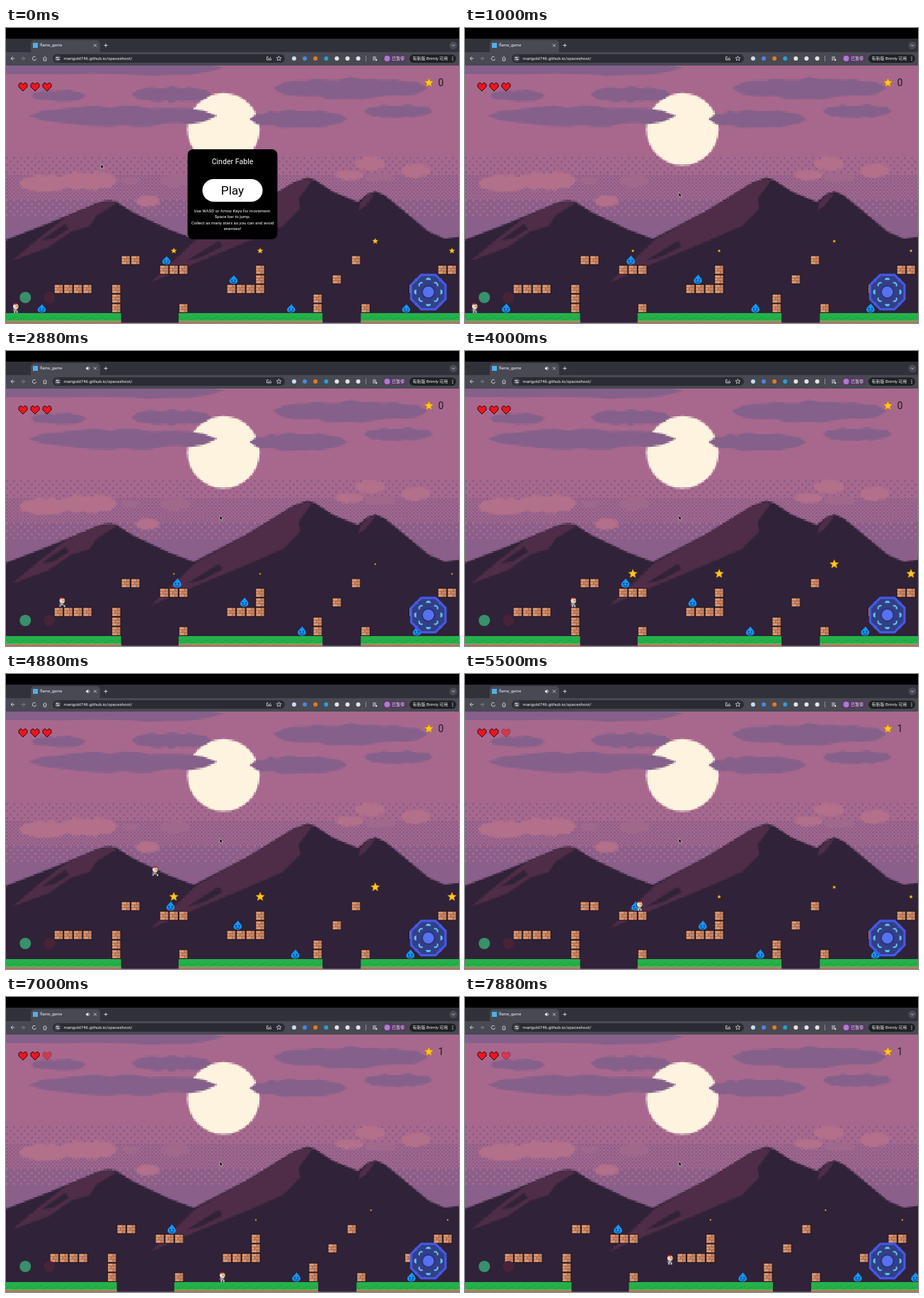
Recreate the animation shown at these times as an HTML page with a canvas. Size 640 by 416 pixels, loop 8 s.

```html
<!DOCTYPE html>
<html lang="zh">
<head>
<meta charset="utf-8">
<title>flame_game</title>
<style>
html, body { margin: 0; width: 640px; height: 416px; overflow: hidden; background: #000; }
canvas { display: block; }
</style>
</head>
<body>
<canvas id="stage" width="640" height="416"></canvas>
<script>
const ctx = document.getElementById('stage').getContext('2d');
const LOOP = 8000, STEP = 125, U = 13.55;
const UI = 'Roboto, "Noto Sans CJK SC", "Noto Sans CJK", sans-serif';
const colX = c => (c + 0.5) * U;
const rowY = r => 395.2 - r * U;
const mix = (a, b, k) => a + (b - a) * k;
const clamp = k => Math.min(1, Math.max(0, k));
const ease = k => k * k * (3 - 2 * k);

function random(seed) {
  return () => (seed = (seed * 16807) % 2147483647) / 2147483647;
}
function layer(w, h) {
  const c = document.createElement('canvas');
  c.width = w;
  c.height = h;
  return c;
}
function rect(c, color, x, y, w, h) {
  c.fillStyle = color;
  c.fillRect(x, y, w, h);
}
function round(c, color, x, y, w, h, r) {
  c.fillStyle = color;
  c.beginPath();
  c.roundRect(x, y, w, h, r);
  c.fill();
}
function disc(c, color, x, y, r) {
  c.fillStyle = color;
  c.beginPath();
  c.arc(x, y, r, 0, Math.PI * 2);
  c.fill();
}
function path(c, points) {
  c.beginPath();
  for (const p of points.split(' ')) c.lineTo(...p.split(',').map(Number));
}
function poly(c, color, points) {
  path(c, points);
  c.closePath();
  c.fillStyle = color;
  c.fill();
}
function line(c, color, width, points) {
  path(c, points);
  c.strokeStyle = color;
  c.lineWidth = width;
  c.stroke();
}
function text(c, str, x, y, size, color, align = 'left') {
  c.font = size + 'px ' + UI;
  c.textAlign = align;
  c.textBaseline = 'middle';
  c.fillStyle = color;
  c.fillText(str, x, y);
}
// Linear interpolation through [time, value] points
function track(keys, t) {
  let i = 1;
  while (i < keys.length - 1 && keys[i][0] < t) i++;
  const [t0, a] = keys[i - 1], [t1, b] = keys[i];
  return mix(a, b, clamp((t - t0) / (t1 - t0)));
}

// ---- landscape, painted small and enlarged for chunky pixels
function cloud(c, color, x0, y0, x1, y1) {
  const rnd = random(x0 * 31 + y1 * 7 + 1), n = 14, edge = [];
  const mid = mix(y0, y1, 0.52), half = (y1 - y0) / 2;
  for (let i = 0; i < 2 * n; i++) {
    const s = i < n ? i / n * 2 - 1 : 1 - (i - n) / n * 2;
    const h = half * (1 - s * s) ** 0.45 * mix(0.75, 1.1, rnd());
    edge.push(`${mix(x0, x1, (s + 1) / 2)},${mid + (i < n ? -h : h)}`);
  }
  poly(c, color, edge.join(' '));
}
function paintLandscape(out) {
  const P = 2.5, top = 52;
  const small = layer(256, 146), c = small.getContext('2d');
  const high = '#a8688d', low = '#8a5f8a';
  const dark = '#302238', lit = '#4f2d48';
  rect(c, high, 0, 0, 256, 76);
  rect(c, low, 0, 76, 256, 70);
  for (let y = 51; y < 86; y++) {
    for (let x = 0; x < 256; x++) {
      const sparse = y % 2 === 0 && x % 4 === (y % 4 ? 2 : 0);
      const dot = y < 62 || y >= 76 ? sparse : (x + y) % 2 === 0;
      if (dot) rect(c, y < 76 ? low : high, x, y, 1, 1);
    }
  }
  c.setTransform(1 / P, 0, 0, 1 / P, 0, -top / P);
  disc(c, '#fdf3df', 307, 142.5, 51);
  for (const box of [
    [-60, 36, 308, 74], [35, 87, 113, 103], [177, 82, 290, 104], [32, 109, 298, 138],
    [344, 115, 482, 140], [376, 69, 596, 99], [505, 107, 603, 126]
  ]) cloud(c, '#85608a', ...box);
  for (const box of [
    [18, 205, 90, 231], [72, 201, 158, 228], [183, 235, 217, 252], [465, 200, 506, 214],
    [492, 181, 536, 201], [558, 190, 600, 211]
  ]) cloud(c, '#b3708a', ...box);
  for (const box of [[163, 210, 188, 220], [218, 205, 262, 225], [505, 205, 550, 217]]) {
    cloud(c, '#a0698c', ...box);
  }

  poly(c, dark, '0,298 60,275 128,247 140,243 154,244 180,260 230,284 265,297 340,258 405,218 425,211 436,214 462,231 497,245 510,234 522,230 535,236 561,257 597,287 620,297 640,294 640,416 0,416');
  poly(c, lit, '85,266 128,247 148,243 156,247 128,264 118,279 92,287 60,309 8,328 45,297');
  poly(c, dark, '84,276 50,299 66,297 88,283');
  poly(c, lit, '405,219 425,212 432,215 413,241 416,254 391,279 341,301 270,330 204,359 268,298 340,259');
  poly(c, dark, '300,300 255,328 278,322 306,307');
  poly(c, lit, '522,231 510,235 501,245 497,258 508,250 516,240');
  out.imageSmoothingEnabled = false;
  out.drawImage(small, 0, top, 640, 146 * P);
  out.imageSmoothingEnabled = true;
}

function paintBrowser(c) {
  const ink = '#dddee2', dim = '#8b8c93', bar = '#484952', strip = '#303139', field = '#2b2c33';
  rect(c, '#000', 0, 0, 640, 15);
  rect(c, strip, 0, 15, 640, 19);
  round(c, bar, 35, 17, 98, 20, 5);
  rect(c, bar, 0, 34, 640, 19);
  rect(c, '#4fb0ea', 38, 21, 7, 7);
  text(c, 'flame_game', 48, 24.6, 5.7, '#f0f0f3');
  line(c, ink, 0.8, '124,22.5 128,26.5');
  line(c, ink, 0.8, '128,22.5 124,26.5');
  line(c, ink, 0.9, '138.5,24.5 143.5,24.5');
  line(c, ink, 0.9, '141,22 141,27');
  disc(c, bar, 632, 24.5, 5.5);
  line(c, ink, 0.9, '630,23.5 632,25.5 634,23.5');

  line(c, ink, 0.9, '12,43 7,43 9.5,40.5');
  line(c, ink, 0.9, '7,43 9.5,45.5');
  line(c, dim, 0.9, '21.5,43 26.5,43 24,40.5');
  line(c, dim, 0.9, '26.5,43 24,45.5');
  c.strokeStyle = ink;
  c.beginPath();
  c.arc(40, 43, 2.6, 0.2, 5.4);
  c.stroke();
  line(c, ink, 0.9, '52.5,43 55,40.4 57.5,43');
  line(c, ink, 0.9, '53.3,42.5 53.3,46 56.7,46 56.7,42.5');

  round(c, field, 66, 37, 328, 12, 6);
  disc(c, bar, 73, 43, 4.5);
  for (const [x, y] of [[72, 41.7], [74, 44.3]]) {
    rect(c, ink, 70.5, y - 0.4, 5, 0.8);
    disc(c, ink, x, y, 1);
  }
  text(c, 'marigold746.github.io/spaceshoot/', 81.5, 43.2, 6.15, '#f0f0f3');
  line(c, ink, 0.8, '371,40.8 368.5,40.8 368.5,45 374.5,45 374.5,43');
  line(c, ink, 0.8, '370,43 372,44 374,41');
  star(c, 385.5, 43, 7, field, ink, 0.8);

  ['#c9dcec', '#4a86e0', '#e8781e', '#2a9fd0', '#e4e4e6', '#e4e4e6', '#e4e4e6']
    .forEach((color, i) => disc(c, color, 407 + i * 15.1, 43, 3));
  rect(c, dim, 508, 39, 1, 8);
  for (const y of [41, 43, 45]) rect(c, ink, 518, y - 0.5, y === 45 ? 3 : 5, 0.9);
  disc(c, ink, 523, 45, 1.3);
  round(c, '#553b62', 532, 37.5, 35, 11.5, 6);
  disc(c, '#b07ad0', 538.5, 43, 4);
  text(c, '已暂停', 545, 43.2, 6, '#efe4f5');
  round(c, '#1f2023', 570, 37.5, 66, 11.5, 6);
  text(c, '有新版 Brimly 可用', 574.5, 43.2, 6, '#f0f0f2');
  for (const y of [41, 43.2, 45.4]) disc(c, ink, 631, y, 0.7);
}

// ---- sprites
function star(c, x, y, size, fill, edge, width) {
  c.beginPath();
  for (let i = 0; i < 10; i++) {
    const a = i * Math.PI / 5 - Math.PI / 2, r = size / 2 * (i % 2 ? 0.45 : 1);
    c.lineTo(x + r * Math.cos(a), y + r * Math.sin(a));
  }
  c.closePath();
  c.fillStyle = fill;
  c.fill();
  c.strokeStyle = edge;
  c.lineWidth = width;
  c.stroke();
}
function heart(x, y, alive) {
  ctx.save();
  ctx.translate(x, y);
  ctx.globalAlpha = alive ? 1 : 0.55;
  poly(ctx, '#f0141c', '0,6 -6,0 -6,-3.4 -4.2,-5.4 -2,-5.4 0,-3.4 2,-5.4 4.2,-5.4 6,-3.4 6,0');
  ctx.strokeStyle = alive ? '#1a0a12' : '#6d2b4c';
  ctx.lineWidth = 1;
  ctx.stroke();
  ctx.restore();
}
function brick(x, y) {
  const l = x - U / 2, t = y - U / 2;
  rect(ctx, '#21151b', l, t, U, U);
  rect(ctx, '#8f5a48', l + 0.9, t + 0.9, U - 1.8, U - 1.8);
  for (let r = 0; r < 3; r++) {
    const cut = r % 2 ? 4 : 7, ry = t + 1.1 + r * 3.95;
    rect(ctx, '#dc9a74', l + 1.1, ry, cut - 0.4, 3.2);
    rect(ctx, '#cb8662', l + 1.5 + cut, ry, 10.5 - cut, 3.2);
  }
}
function ground(c0, c1) {
  const x = c0 * U, w = (c1 - c0) * U;
  rect(ctx, '#25b14a', x, 402, w, 14);
  for (let i = 0; i < (c1 - c0) * 4; i++) {
    rect(ctx, '#1d9f41', x + i * U / 4, 407 + (i * 3) % 4, 1.6, 2);
  }
  rect(ctx, '#8fb26a', x, 412.6, w, 1.2);
  rect(ctx, '#b3715a', x, 413.8, w, 2.2);
}
function drop(x, y, squash) {
  ctx.save();
  ctx.translate(x, y + 6);
  ctx.scale(1, squash ? 0.9 : 1);
  ctx.fillStyle = '#1496f5';
  ctx.beginPath();
  ctx.moveTo(0.5, -13);
  ctx.bezierCurveTo(3, -9, 5.8, -7.5, 5.8, -4);
  ctx.bezierCurveTo(5.8, 1.4, -5.8, 1.4, -5.8, -4);
  ctx.bezierCurveTo(-5.8, -7.5, -2, -9, 0.5, -13);
  ctx.fill();
  for (const s of [-1, 1]) rect(ctx, '#0b2f66', s * 2.2 - 0.8, -6.4, 1.6, 2);
  line(ctx, '#0b2f66', 1, '-3,-3.2 -1.5,-2 1.5,-2 3,-3.2');
  ctx.restore();
}
function hero(x, y, stride) {
  ctx.save();
  ctx.translate(x, y);
  const r = (color, ...box) => rect(ctx, color, ...box);
  disc(ctx, '#2a1c2c', -0.3, -2.6, 4.6);
  disc(ctx, '#e2dcdc', -0.3, -2.6, 3.8);
  r('#d92a34', -3.4, -6.8, 5, 1.8);
  r('#d0aa45', -0.4, -4, 3.8, 2.8);
  r('#aaa3a6', -2.8, 0.8, 5, 3.4);
  r('#6f6670', -4.4, 0.8, 1.6, 3);
  r('#3a3040', 0.8, 1.6, 5, 1.4);
  r('#cfc8c6', -2.8 - stride, 4, 2, 2.6 - stride * 0.4);
  r('#cfc8c6', 0.6 + stride, 4, 2, 2.6);
  ctx.restore();
}
function bullet(x, y) {
  for (const s of [-1, 1]) line(ctx, '#3566d8', 1.4, `${x + s * 5},${y - 3} ${x + s * 3},${y + 1.5}`);
  line(ctx, '#d02a3c', 1.9, `${x - 3},${y - 3} ${x},${y + 3} ${x + 3},${y - 3}`);
}
function octagon(color, r) {
  ctx.beginPath();
  for (let i = 0; i < 8; i++) {
    const a = (i + 0.5) * Math.PI / 4;
    ctx.lineTo(r * Math.cos(a), r * Math.sin(a));
  }
  ctx.fillStyle = color;
  ctx.fill();
}
function joystick() {
  ctx.save();
  ctx.translate(596.7, 372.3);
  octagon('#4359e6', 28);
  octagon('#333f86', 24.5);
  for (let i = 0; i < 4; i++) {
    poly(ctx, '#5cc6ee', '-4,-17 -2,-20 2,-20 4,-17');
    line(ctx, '#5cc6ee', 2, '8,-13 11,-13 13,-11 13,-8');
    rect(ctx, '#4359e6', 15, -19, 4, 4);
    ctx.rotate(Math.PI / 2);
  }
  disc(ctx, '#2b3677', 0, 0, 10);
  disc(ctx, '#5672f2', 0, 0, 7.8);
  ctx.restore();
}
function dialog() {
  round(ctx, '#000', 256.5, 171, 127, 127, 8);
  text(ctx, 'Cinder Fable', 320, 189, 10.6, '#fff', 'center');
  round(ctx, '#fff', 277.5, 213, 85, 32, 16);
  text(ctx, 'Play', 320, 229.5, 17.2, '#000', 'center');
  ['Use WASD or Arrow Keys for movement.', 'Space bar to jump.',
    'Collect as many stars as you can and avoid', 'enemies!']
    .forEach((s, i) => text(ctx, s, 320, 258 + i * 8.4, 6.1, '#fff', 'center'));
}
function cursor(x, y) {
  poly(ctx, '#000', [[0, 0], [0, 6.4], [1.6, 5], [2.7, 7.4], [3.8, 6.9], [2.8, 4.6], [4.7, 4.5]]
    .map(([dx, dy]) => `${x - 1 + dx},${y - 3 + dy}`).join(' '));
  ctx.strokeStyle = '#ddd';
  ctx.lineWidth = 0.6;
  ctx.stroke();
}
function speaker() {
  poly(ctx, '#e6e7ea', '113,23.3 114.4,23.3 116.3,21.6 116.3,27.4 114.4,25.7 113,25.7');
  line(ctx, '#e6e7ea', 0.7, '117.4,23 118,24.5 117.4,26');
}

// ---- level, in grid cells: [col, row, width, height]
const walls = [
  [5, 2, 4], [11, 0, 1, 3], [12, 5, 2], [16, 4, 3], [18, 0], [23, 2, 4], [26, 3, 1, 2],
  [32, 0, 1, 2], [34, 3], [36, 5], [37, 0], [42, 2, 2], [45, 4, 2]
];
const floors = [[0, 12], [18, 33], [37, 52]];
const stars = [
  { col: 17, row: 6, end: 5125 }, { col: 26, row: 6 }, { col: 38, row: 7 }, { col: 46, row: 6 }
];
const drops = [
  { col: 3, row: 0, end: 1750 }, { col: 16, row: 5 }, { col: 23, row: 3, end: 6250 },
  { col: 29, row: 0 }, { col: 41, row: 0 }, { col: 47, row: 0 }
];
const shots = [
  { from: 1375, to: 1750, x: 18, y: 395 }, { from: 5875, to: 6250, x: 282, y: 351 }
];
const run = [[1875, 14], [4875, 211], [6125, 283], [6500, 306], [7250, 306], [7500, 290]];
// Each hop: start, end, row left, row reached, lift
const hops = [
  [1875, 2750, 0, 3, 22], [3375, 3950, 3, 3, 24], [4000, 4400, 3, 6, 8],
  [4500, 5300, 6, 5, 42], [5500, 6150, 5, 0, 12], [7500, 8100, 0, 0, 26]
];

function heroY(t) {
  let y = rowY(0);
  for (const [t0, t1, from, to, lift] of hops) {
    if (t < t0) break;
    const k = clamp((t - t0) / (t1 - t0));
    y = mix(rowY(from), rowY(to), k) - 4 * lift * k * (1 - k);
  }
  return y;
}
// Drops walk two cells out and back, one cell per second
function patrol(t) {
  const span = 2 * U, u = (U * t / 1000 - 3 + 2 * span) % (2 * span);
  return u < span ? u : 2 * span - u;
}
// Stars shrink for 0.5 s, then swell for 0.33 s
function starSize(t) {
  const p = (t / 833 + 0.18) % 1;
  const k = p < 0.6 ? p / 0.6 : (1 - p) / 0.4;
  return 14 - 11 * (1 - (1 - k) ** 2);
}

const backdrop = layer(640, 416);
const bctx = backdrop.getContext('2d');
paintLandscape(bctx);
paintBrowser(bctx);

function draw(t) {
  const live = o => o.end === undefined || t < o.end;
  const menu = t < 750;
  ctx.drawImage(backdrop, 0, 0);
  if (t >= 1375) speaker();

  ctx.save();
  ctx.translate(-12.2 * clamp((t - 6750) / 500), 0);
  for (const [a, b] of floors) ground(a, b);
  for (const [c, r, w = 1, h = 1] of walls) {
    for (let i = 0; i < w * h; i++) brick(colX(c + i % w), rowY(r + Math.floor(i / w)));
  }
  const size = starSize(t), shift = patrol(t);
  for (const s of stars.filter(live)) star(ctx, colX(s.col), rowY(s.row) + 0.3, size, '#fcc81c', '#d08a10', size / 22);
  for (const d of drops.filter(live)) drop(colX(d.col) + shift, rowY(d.row), menu);
  for (const s of shots) {
    if (t >= s.from && t < s.to) bullet(s.x + (t - s.from) * 0.18, s.y);
  }
  ctx.restore();

  const moving = track(run, t) !== track(run, t - STEP);
  hero(track(run, t), heroY(t), moving && (t / STEP) % 2 ? 1.4 : 0);

  for (let i = 0; i < 3; i++) heart(24 + i * 17, 83, i < 2 || t < 5250);
  star(ctx, 597.5, 77.3, 14, '#fcc81c', '#b07818', 0.7);
  text(ctx, t < 5125 ? '0' : '1', 614.5, 77.6, 14, '#21191f', 'center');
  disc(ctx, '#38906c', 27.3, 380, 8);
  disc(ctx, '#482338', 61.3, 380, 8);
  joystick();
  if (menu) dialog();
  const glide = ease(clamp((t - 125) / 750));
  cursor(mix(135, 303, glide), mix(195, 235, glide));
}

const start = performance.now();
function frame() {
  const t = (performance.now() - start) % LOOP;
  draw(Math.floor(t / STEP) * STEP);
  requestAnimationFrame(frame);
}
frame();
</script>
</body>
</html>
```
